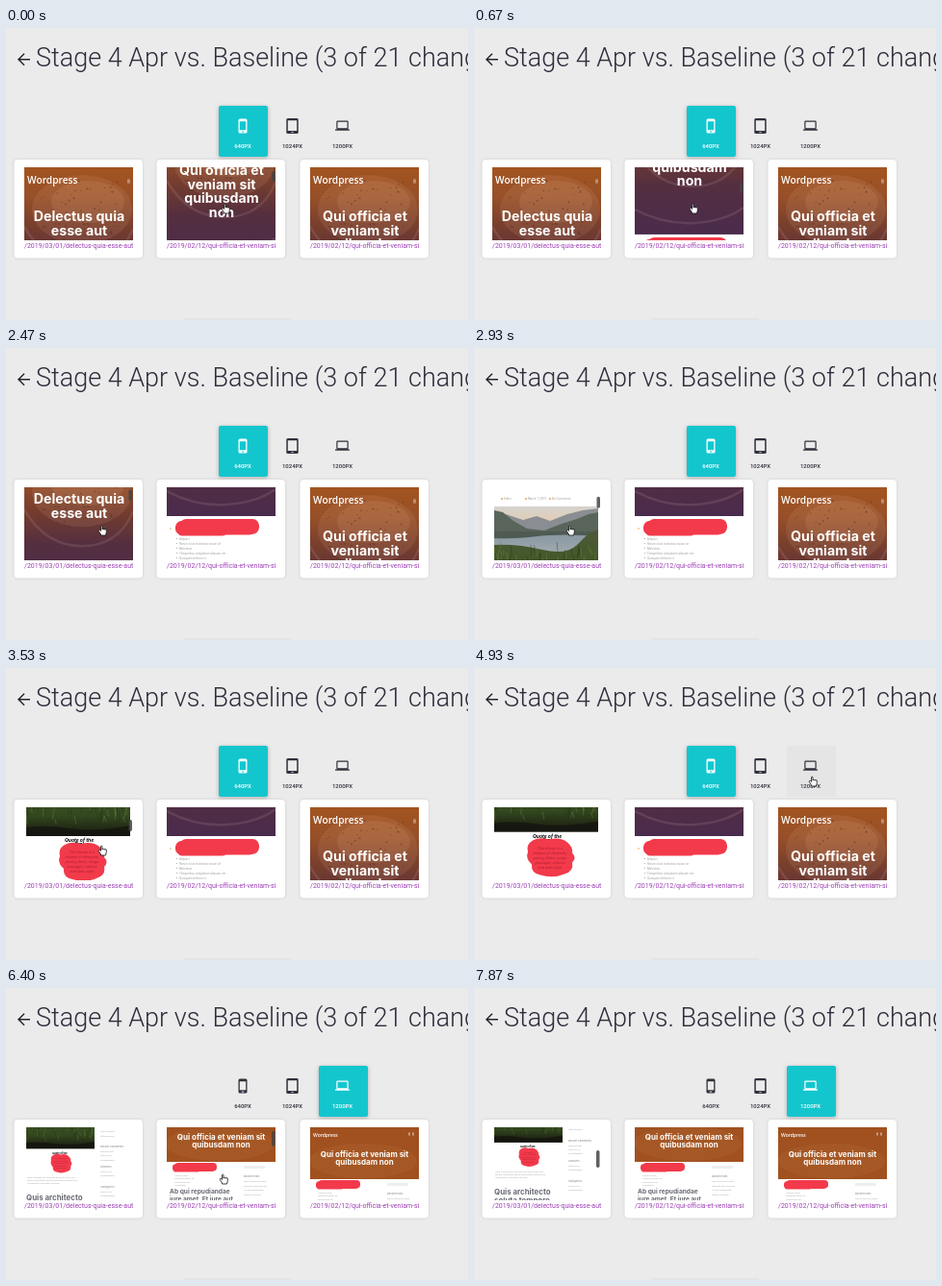
Animation of 480x304 px, one loop 7990 ms. Source, as an HTML page:

```html
<!DOCTYPE html>
<html lang="en">
<head>
<meta charset="utf-8">
<title>Visual regression cards</title>
<style>
html, body { margin: 0; width: 100%; height: 100%; overflow: hidden; background: #ebebeb; }
#stage { display: block; width: 480px; height: 304px; font-family: Roboto, sans-serif; }
.card { fill: #fff; filter: drop-shadow(0 .5px 1.5px #0002); }
.url { font-size: 7px; fill: #9c3fb4; }
.tab { color: #30303c; font-size: 6px; font-weight: 500; text-anchor: middle; fill: currentColor; fill-rule: evenodd; }
.tab.on { color: #fff; }
.bold { font-family: Inter, "Open Sans", sans-serif; font-weight: 700; }
.mid { text-anchor: middle; fill: #fff; }
.brand { font-family: "Open Sans", sans-serif; font-weight: 600; fill: #fff; }
.tiny { font-size: 2.8px; fill: #a2a2a2; }
.head { fill: #696b74; }
</style>
</head>
<body>
<svg id="stage" viewBox="0 0 480 304"></svg>
<script>
const LOOP = 7990, SWITCH = 5200, RED = '#f23a4b';
let seed = 7;
const rand = () => (seed = seed * 16807 % 2147483647) / 2147483647;
const many = (n, f) => Array.from({ length: n }, (_, i) => f(i)).join('');
const box = (x, y, w, h, fill, more = '') =>
  `<rect x="${x}" y="${y}" width="${w}" height="${h}" fill="${fill}" ${more}/>`;
const path = (d, more = '') => `<path d="${d}" ${more}/>`;
const lines = (rows, x, y, step, cls, size) => rows.map((s, i) =>
  `<text x="${x}" y="${y + i * step}" class="${cls}" ${size ? `style="font-size:${size}px"` : ''}>${s}</text>`).join('');

const defs = `<defs>
  <linearGradient id="coffee" x2="0" y2="1">
    <stop stop-color="#a2541f"/><stop offset=".2" stop-color="#985028"/>
    <stop offset=".45" stop-color="#713b2f"/><stop offset=".65" stop-color="#552f40"/><stop offset="1" stop-color="#492b4c"/>
  </linearGradient>
  <linearGradient id="sky" x2="0" y2="1"><stop stop-color="#d5d3ce"/><stop offset="1" stop-color="#efc7a2"/></linearGradient>
  <linearGradient id="water" x2="0" y2="1"><stop stop-color="#8696a0"/><stop offset="1" stop-color="#a3abb0"/></linearGradient>
  <linearGradient id="grass" x2="0" y2="1">
    <stop stop-color="#4f5a3a"/><stop offset=".3" stop-color="#45582c"/>
    <stop offset=".75" stop-color="#33481f"/><stop offset="1" stop-color="#17180f"/>
  </linearGradient>
  <g id="hero">
    ${box(0, 0, 113, 150, 'url(#coffee)')}
    <ellipse cx="60" cy="44" rx="52" ry="36" fill="#e0a98a" opacity=".13"/>
    <ellipse cx="66" cy="36" rx="38" ry="22" fill="#e6b08c" opacity=".13"/>
    ${path('M0 62Q22 100 60 100T113 64M0 124Q30 140 62 138T113 122', 'fill="none" stroke="#c9a0a8" stroke-opacity=".17" stroke-width="2.500"')}
    ${many(70, () => `<circle cx="${15 + rand() * 85}" cy="${14 + rand() * 62}" r="${.3 + rand() * .8}" fill="#5b2a1a" opacity=".45"/>`)}
  </g>
  <g id="lake">
    ${box(0, 0, 108, 30, 'url(#sky)')}
    ${path('M0 9L12 8 30 14 44 10 58 15 76 8 92 4 108 2V32H0z', 'fill="#8a8e92"')}
    ${path('M0 4L9 6 20 15 34 23 52 25 70 18 86 13 98 8 108 6V32H0z', 'fill="#59655a"')}
    ${box(0, 27, 108, 24, 'url(#water)')}
    ${path('M0 26H108V31Q70 28 45 31T0 33z', 'fill="#4e5a52"')}
    ${path('M0 40Q25 39 50 45T86 40L98 28 108 24V110H0z', 'fill="url(#grass)"')}
    ${many(130, () => {
      const x = rand() * 108, y = 48 + rand() * 50;
      return path(`M${x} ${y}l${rand() * 4 - 2} ${-5 - rand() * 8}`,
        `stroke="${rand() < .5 ? '#75843f' : '#233616'}" stroke-width=".7" opacity=".6"`);
    })}
    ${path('M0 101Q20 98 45 102T108 99V110H0z', 'fill="#15150f" opacity=".8"')}
  </g>
</defs>`;

const menu = (x, y, s) => path(`M${x} ${y}h${s}m${-s} ${s / 2}h${s}m${-s} ${s / 2}h${s}`, 'stroke="#fff" stroke-width=".6" opacity=".8"');

// Marker scribble: overlapping rounded strokes
const strip = (x, y, w, h) => box(x, y + h * .12, w * .96, h * .82, RED, `rx="${h * .36}"`) +
  box(x + w * .05, y, w * .95, h * .9, RED, `rx="${h * .4}"`) +
  box(x + w * .02, y + h * .3, w * .6, h * .7, RED, `rx="${h * .3}"`);

const blob = (x, y, w, h) => `<g transform="translate(${x} ${y}) scale(${w / 52} ${h / 40})">
  ${path('M7 2Q14-2 24 1 36-2 43 4 49 9 48 15 53 20 48 25 50 34 40 37 28 42 15 38 5 36 6 27-1 21 2 14 0 6 7 2z', `fill="${RED}"`)}
  <g text-anchor="middle" opacity=".65" style="font-style:italic">
  ${lines(['This theme is a', 'mixture of elements,', 'poetry, dates, songs', 'passages, colours', 'and plain style'], 25, 11, 5, '', 4).replaceAll('<text', '<text fill="#8c1226"')}</g></g>`;

const phoneHero = rows => `<use href="#hero"/>${lines(['Wordpress'], 3, 17, 0, 'brand', 10.2)}
  ${menu(107, 13, 3)}${lines(rows, 57, 56, 14.5, 'bold mid', 14.2)}`;

const wideHero = `${box(0, 0, 113, 54, '#a0511f')}
  <ellipse cx="55" cy="35" rx="56" ry="18" fill="#c47d4b" opacity=".15"/>
  ${lines(['Wordpress'], 3, 9.5, 0, 'brand', 5)}${menu(102, 6, 2)}${menu(106, 6, 2)}
  ${lines(['Qui officia et veniam sit', 'quibusdam non'], 56.5, 30.5, 8.7, 'bold mid', 8)}`;

const officia = ['Qui officia et', 'veniam sit', 'quibusdam', 'non'];
const items = ['Adipisci', 'Rerum sit at molestias earum sit', 'Molestiae', 'Temporibus voluptatum aliquam est', 'Quisquam dolores et'];

const phonePost = phoneHero(officia) + strip(9, 153, 87, 17.5) +
  '<circle cx="4" cy="163" r=".8" fill="#e9a04c"/>' +
  lines(items, 13, 174.5, 5, 'tiny', 3) +
  many(5, i => `<circle cx="10.5" cy="${173.5 + i * 5}" r=".5" fill="#999"/>`);

const widePost = wideHero + strip(6, 55, 46, 9.5) +
  lines(['Adipisci rerum', 'Molestias earum sit', 'Temporibus est', 'Voluptatum'], 8, 69, 3.3, 'tiny', 2.3) +
  lines(['Ab qui repudiandae', 'iure amet. Et iure aut'], 3, 87, 7.5, 'bold head', 6.6) +
  box(80, 58, 22, 3, '#eee') +
  lines(['Recent Posts'], 80, 70, 0, 'tiny bold', 2.6) +
  lines(['Quis architecto soluta', 'Delectus quia esse aut', 'Ab qui repudiandae', 'Officia et veniam'], 80, 75, 4.5, 'tiny', 2.4);

const phonePhoto = phoneHero(['Delectus quia', 'esse aut']) +
  ['Editor', 'March 1, 2019', 'No Comments'].map((s, i) =>
    `<circle cx="${10 + i * 25}" cy="177" r="1" fill="#e9a04c"/>` + lines([s], 12 + i * 25, 178, 0, 'tiny', 3)).join('') +
  '<use href="#lake" x="2" y="185"/>' +
  `<g text-anchor="middle" style="font-style:italic">${lines(['Quote of the', 'Day'], 57, 301, 4.5, 'bold', 5)}</g>` +
  blob(35, 302, 52, 40);

// Starts where the wide page is already scrolled to
const widePhoto = '<use href="#lake" transform="translate(2 -50) scale(.657)"/>' +
  lines(['Quote of the'], 29, 27.5, 0, 'bold', 2.6) + blob(27, 28, 23, 19.5) +
  lines(['Quia voluptas aut dolorem et nemo ipsum sit', 'Rerum molestias earum temporibus aliquam et', 'Voluptatum quisquam dolores'], 3, 53, 3.2, 'tiny', 2.5) +
  lines(['Quis architecto', 'soluta tempore', 'quisquam'], 2, 76, 9.3, 'bold head', 7.9) +
  ['Recent Comments', 'Archives', 'Categories'].map((s, i) => lines([s], 79, 21 + i * 21, 0, 'tiny bold', 2.7) +
    lines(['Delectus quia', 'March 2019', 'Uncategorized'].slice(i ? 1 : 0), 79, 26 + i * 21, 4.3, 'tiny', 2.3)).join('') +
  lines(['Quis architecto', 'Officia veniam'], 79, 5, 4.5, 'tiny', 2.3);

const card = (x, i, phone, wide, url) => `
  ${box(x - 10.5, 137, 133.5, 102.5, '', 'rx="4" class="card"')}
  <svg x="${x}" y="145" width="113" height="76"><g id="phone${i}">${phone}</g><g id="wide${i}">${wide}</g></svg>
  <svg x="${x}" y="220" width="113" height="12"><text y="8.7" class="url">${url}</text></svg>`;

const icons = [
  'M-3-7.500h6q1.500 0 1.500 1.500v12q0 1.500-1.500 1.500h-6q-1.500 0-1.500-1.500v-12q0-1.500 1.500-1.500zm-.2 2.800v9h6.400v-9zm2 10.300v.8h2.400v-.8z',
  'M-4.700-8h9.400q1.500 0 1.500 1.500v13q0 1.500-1.500 1.500h-9.400q-1.500 0-1.500-1.500v-13q0-1.500 1.500-1.500zm0 2.200v10.800h9.400v-10.800zm3.500 12v.8h2.400v-.8z',
  'M-5-5.500h10q1.200 0 1.200 1.200v6.600q0 1.200-1.200 1.200h2.500v1.300h-15v-1.300h2.500q-1.200 0-1.200-1.200v-6.600q0-1.200 1.200-1.200zm0 1.200v6.500h10v-6.500z'
];
const tabs = ['640PX', '1024PX', '1200PX'].map((s, i) =>
  `<g class="tab" transform="translate(${[246, 297.5, 349.5][i]} 102)">${path(icons[i])}<text y="23">${s}</text></g>`).join('');

const post = '/2019/02/12/qui-officia-et-veniam-sit-quibusdam-non';
const $ = id => document.getElementById(id);
$('stage').innerHTML = defs + box(0, 0, 480, 304, '#ebebeb') +
  path('M25 32.700H13.500M19 26.700l-6 6 6 6', 'fill="none" stroke="#26262e" stroke-width="1.500"') +
  '<text x="31" y="40" font-size="27" font-weight="300" fill="#2d2d3d">Stage 4 Apr vs. Baseline (3 of 21 changed)</text>' +
  box(325, 81, 51, 53, '#e5e5e5', 'id="hover" rx="2"') +
  box(0, 81, 51, 53, '#13c6ce', 'id="active" rx="2" style="filter:drop-shadow(0 1px 2px #0004)"') + tabs +
  card(19, 1, phonePhoto, widePhoto, '/2019/03/01/delectus-quia-esse-aut') +
  card(167, 2, phonePost, widePost, post) +
  card(316, 3, phoneHero(officia), widePost, post) +
  box(184, 302, 112, 2, '#e4e4e4') +
  box(0, 0, 3.5, 14, '#444', 'id="bar" rx="1.700" opacity=".85"') +
  `<g id="hand">${path('M2.500 1v4.500l-1-1c-1-.5-1.700.4-1 1.300l2 3.200v1h5l.8-3.200V4.300c0-.9-1.300-.9-1.400 0 0-1-1.400-1.100-1.500-.2 0-.9-1.300-1-1.400-.1V1c0-1.200-1.500-1.200-1.500 0z',
    'fill="#fff" stroke="#111" stroke-width=".8" stroke-linejoin="round"')}</g>`;

// Keys are [time, value] pairs
function at(t, keys, ease = u => u) {
  const i = keys.findIndex(k => k[0] > t);
  if (i < 0) return keys[keys.length - 1][1];
  if (!i) return keys[0][1];
  const [t0, a] = keys[i - 1], [t1, b] = keys[i];
  return a + (b - a) * ease((t - t0) / (t1 - t0));
}
const smooth = u => u * u * (3 - 2 * u);

const handX = [[670, 228], [1400, 192], [1500, 191], [2070, 100], [3930, 100], [4530, 338], [4730, 342], [4900, 352], [5530, 352], [5670, 226], [6600, 226], [6930, 102], [7730, 102], [7870, 345]];
const handY = [[670, 188], [1400, 174], [1500, 174], [2070, 190], [3930, 190], [4530, 122], [4900, 118], [5530, 118], [5670, 199], [6600, 199], [6930, 185], [7730, 185], [7870, 267]];
const scrolls = {
  phone1: [[2330, 0], [2930, 165], [3070, 180], [3130, 180], [3530, 265], [3730, 269.5]],
  phone2: [[70, 48], [470, 80], [670, 80], [1130, 120]],
  wide1: [[6930, 0], [7330, 4], [7400, 4], [7530, 6.5]],
  wide2: [[6070, 0], [6400, 18]]
};
// [start, end, x, y at start, y at end, height]
const bars = [[0, 1250, 276, 149, 163, 11], [2330, 3930, 127.5, 145, 158, 12], [6070, 6600, 276, 147, 150, 16], [6930, LOOP, 127, 167, 169, 18]];

function draw(now) {
  const t = now % LOOP, wide = t >= SWITCH;
  for (const id in scrolls) $(id).setAttribute('transform', `translate(0 ${-at(t, scrolls[id])})`);
  for (const i of [1, 2, 3]) {
    $('phone' + i).style.display = wide ? 'none' : '';
    $('wide' + i).style.display = wide ? '' : 'none';
  }
  $('active').setAttribute('x', wide ? 325 : 221);
  $('hover').style.display = t > 4480 && !wide ? '' : 'none';
  document.querySelectorAll('.tab').forEach((g, i) => g.classList.toggle('on', i === (wide ? 2 : 0)));
  const bar = bars.find(b => t >= b[0] && t < b[1]);
  $('bar').style.display = bar ? '' : 'none';
  if (bar) {
    const [t0, t1, x, y0, y1, h] = bar;
    $('bar').setAttribute('transform', `translate(${x} ${at(t, [[t0, y0], [Math.min(t1, t0 + 800), y1]])})`);
    $('bar').setAttribute('height', h);
  }
  $('hand').style.display = t < 7870 ? '' : 'none';
  $('hand').setAttribute('transform', `translate(${at(t, handX, smooth) - 4} ${at(t, handY, smooth) - 5})`);
  requestAnimationFrame(draw);
}
draw(performance.now());
</script>
</body>
</html>
```
